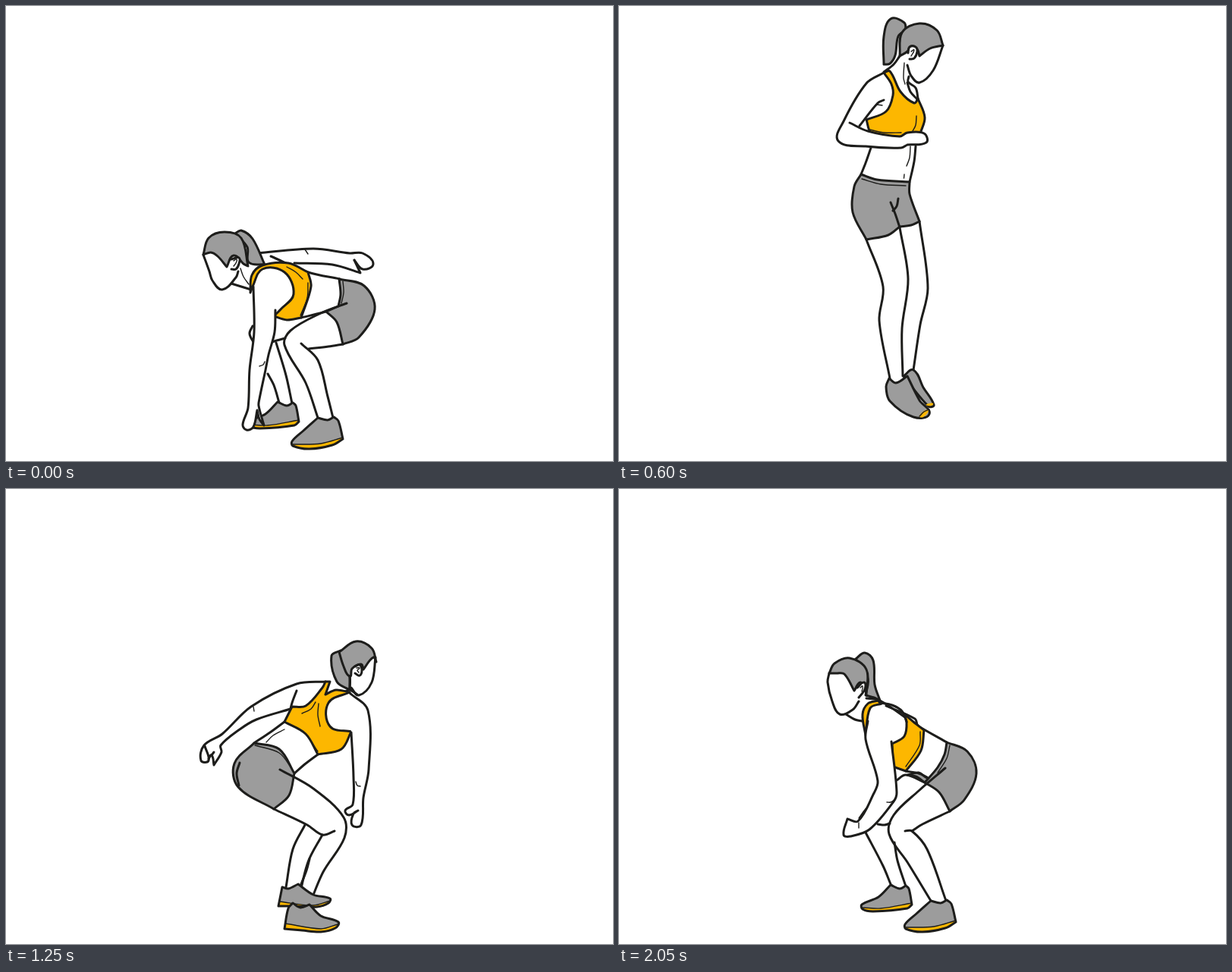
An HTML page for the animation above (2.2 s loop, 800 px wide and 600 px high).

```html
<!DOCTYPE html>
<html lang="en">
<head>
<meta charset="utf-8">
<title>Squat jump with turn</title>
<style>
html, body { margin: 0; width: 100%; height: 100%; overflow: hidden; background: #fff; }
svg { display: block; width: 800px; height: 600px; }
path { stroke: #1d1d1b; stroke-linecap: round; stroke-linejoin: round; }
</style>
</head>
<body>
<svg id="stage" viewBox="0 0 800 600"></svg>
<script>
const GREY = "#9c9c9c", ORANGE = "#fdb700";
const stage = document.getElementById("stage");
let layer = stage;

function add(tag, attrs) {
  const node = document.createElementNS("http://www.w3.org/2000/svg", tag);
  for (const key in attrs) node.setAttribute(key, attrs[key]);
  return layer.appendChild(node);
}

function group(attrs, paint) {
  const outer = layer;
  const node = layer = add("g", attrs);
  paint();
  layer = outer;
  return node;
}

// Smooth path through "x,y" points; "!" marks a corner.
function spline(text, closed) {
  const pts = text.split(" ").map(s => {
    const [x, y] = s.replace("!", "").split(",").map(Number);
    return { x, y, corner: s.endsWith("!") };
  });
  const n = pts.length;
  const at = i => closed ? pts[(i + n) % n] : pts[i];
  const handle = (i, j) => {
    const p = at(i), q = at(j), prev = at(i - 1), next = at(i + 1);
    const len = Math.hypot(q.x - p.x, q.y - p.y) / 3;
    const smooth = !p.corner && prev && next;
    const dx = smooth ? next.x - prev.x : q.x - p.x;
    const dy = smooth ? next.y - prev.y : q.y - p.y;
    const k = len * (smooth && j < i ? -1 : 1) / (Math.hypot(dx, dy) || 1);
    return `${p.x + dx * k} ${p.y + dy * k}`;
  };
  let d = `M${pts[0].x} ${pts[0].y}`;
  for (let i = 0; i < (closed ? n : n - 1); i++) {
    const q = at(i + 1);
    d += `C${handle(i, i + 1)} ${handle(i + 1, i)} ${q.x} ${q.y}`;
  }
  return closed ? d + "Z" : d;
}

const path = (points, fill, width, closed) =>
  add("path", { d: spline(points, closed), fill, "stroke-width": width });
const line = points => path(points, "none", 3, false);
const thin = points => path(points, "none", 1.4, false);
const skin = points => path(points, "#fff", 3, false);
const grey = points => path(points, GREY, 3, true);
const orange = points => path(points, ORANGE, 3, true);
const tint = (points, fill) => path(points, fill, 0, true);

function shoe(upper, sole, seam) {
  tint(`${upper} ${sole}`, ORANGE);
  tint(`${upper} ${seam}`, GREY);
  thin(seam);
  path(`${upper} ${sole}`, "none", 3, true);
}

// Turns a drawing about the hips and moves the hips to a new place.
function turned(paint, [hx, hy], [x, y], angle) {
  group({ transform: `translate(${x - hx} ${y - hy}) rotate(${angle} ${hx} ${hy})` }, paint);
}

function shoesLeft() {
  shoe("386,548! 382,527 378,523! 370,527 358,522! 342,538 320,548",
       "321,554 335,557 380,553", "321,552 345,553 386,546!");
  shoe("444,571! 438,547 432,542! 424,546 411,543! 392,560 377,574",
       "378,580 400,584 430,579", "378,578 415,577 444,569!");
}

function shoesRight() {
  shoe("359,550! 364,525! 372,527 385,521! 405,535 427,540",
       "425,546 410,551 380,550", "427,543 405,549 360,544!");
  shoe("367,580! 372,553 378,546! 388,552 400,548! 415,563 438,571",
       "434,579 415,584 390,582", "437,574 415,580 368,573!");
}

function deepLeft() {
  line("325,422 321,432 327,445");
  line("345,485 353,500 360,523");
  line("356,444 369,487 377,524");
  line("348,444 357,441 368,438");
  line("331,326 405,320 453,326 470,326 484,340 470,347 459,335");
  line("459,335 467,352! 430,341 380,339");
  thin("394,321 398,327");
  grey("302,300! 310,296 325,307 341,341! 320,338 318,318");
  line("260,328 268,350 272,362 285,374 303,358 306,350");
  grey("260,328! 267,306 288,298 310,306 319,343! 313,340 300,329 291,344! 279,330 270,325");
  skin("297,334 307,332 307,340 303,347 297,347");
  thin("300,336 304,334 303,339 300,343");
  line("297,366 310,370 323,374");
  thin("309,346 313,357 320,367");
  line("349,330 398,351 440,360");
  orange("322,378! 324,355 338,342 372,339 398,351! 402,370 389,411! 370,414 353,409! 362,400 379,380 367,351 338,347 325,370");
  thin("370,344 382,351 391,360");
  thin("398,365 397,385 388,408");
  line("389,411 425,402 438,396");
  grey("439,360! 472,369 486,400 465,437 444,446! 436,417 422,403! 438,396! 441,380");
  thin("444,363 445,378 442,392");
  line("449,392 415,405 375,428 367,447 395,497 411,543");
  line("444,446 425,449 399,452");
  line("389,445 411,467 424,515 431,543");
  shoesLeft();
  skin("326,370 327,430 321,480 319,530 312,552 317,559 326,555 331,533! 334,545 340,553! 333,527 334,518 342,480 346,460 354,430 355,401");
  thin("334,475 339,473 341,469");
}

function lowLeft() {
  line("325,453 348,497 358,521");
  line("363,466 367,490 378,524");
  line("341,442 350,443 357,441");
  line("317,434 325,423 340,408");
  grey("312,224! 324,216 335,226 337,258 344,279! 336,275 325,272! 328,250");
  line("277,243 275,255 281,280 291,297 308,291 316,280");
  grey("277,243! 284,230 304,223 326,238 326,271! 324,262 318,255 310,266! 297,244 287,243");
  skin("314,262 323,255 324,264 316,275");
  thin("318,262 321,260 320,267");
  line("299,297 311,304 320,306");
  line("326,276 344,279 390,310 432,334");
  line("352,286 390,303 393,311");
  orange("341,279! 328,283 321,297 325,325! 331,289 346,283!");
  orange("375,296! 388,307 402,318! 398,345 378,372! 361,366! 360,336! 376,326 379,307");
  line("344,282 360,285 373,293 379,307");
  thin("397,320 396,338 378,366");
  grey("380,377! 395,374 406,381 413,380! 403,387! 391,379");
  line("378,372 395,375 406,380");
  line("403,387 378,377 366,384");
  grey("432,334! 459,346 471,375 455,410 436,425! 422,400 403,387! 420,367 429,350");
  thin("436,338 432,355 420,374");
  line("430,368 395,398 362,430 356,455 380,492 411,543");
  line("436,425 400,442 386,451");
  line("377,451 386,451 406,475 431,543");
  shoesLeft();
  skin("328,306 325,330 341,385 335,403 315,438 301,435! 296,456 305,458 330,449 362,412 366,400 359,333");
  thin("316,440 316,447");
  thin("353,413 358,413 363,410");
}

function frontHead() {
  line("307,162 312,195 328,218 343,207 347,197");
  grey("307,168! 311,150 329,143 349,152 354,167 350,183! 344,167 331,158 312,160");
  line("354,176 356,181 354,189 350,191");
  grey("350,190! 349,203 354,208! 358,200 354,188");
  line("349,199 346,217");
  thin("326,219 332,230");
  thin("343,211 336,231");
}

function frontBody() {
  frontHead();
  orange("325,220! 318,224 320,262 328,296 341,306! 375,302 400,274! 395,262! 368,267 356,238 356,208! 349,211 347,250 335,270 322,250");
  line("326,297 335,302 345,301");
  thin("337,282 352,299 373,292");
  thin("372,297 385,291 398,279");
  line("397,263 403,280 424,313");
  line("340,305 355,320 363,331");
  thin("352,306 362,319");
  line("366,324 366.5,325");
  grey("363,331! 393,326 417,307! 438,330 446,354 436,380 420,403! 403,385 383,377! 379,382! 368,372 352,368! 364,357 371,347");
  thin("367,335 395,330 418,312");
  line("395,359 385,373 379,382");
  line("378,355 385,361 389,368");
  skin("358,209 388,228 430,244 457,266 436,326 412,357 403,357 394,343 410,335 425,320 432,265!");
  line("432,270 395,260 373,254");
}

function midLeft() {
  frontBody();
  line("324,220 308,232 312,265 315,293 293,345! 275,349 268,367 278,358 295,354 318,329 333,302");
  line("293,345 298,346 294,351 280,353");
  thin("315,293 318,297 322,298");
  line("352,368 325,407 308,445 330,483 357,523");
  line("355,428 342,448 335,452");
  line("342,448 363,487 375,524");
  line("383,377 355,428 350,453 375,487 410,543");
  line("420,403 392,435 381,448 402,476 430,543");
  shoesLeft();
}

function riseLeft() {
  grey("340,492! 350,496 359,490! 362,530 345,545 335,535");
  grey("374,510! 384,514 394,508! 401,540 386,566 372,558");
  tint("374,562 384,558 394,558 386,564", ORANGE);
  line("323,265 312,365 328,440 340,492");
  line("347,380 350,420 360,490");
  line("352,283 345,365 362,450 374,510");
  line("383,314 380,375 394,450 394,508");
  turned(frontBody, [400, 340], [376, 248], 12);
  line("327,116 308,126 284,190 273,228 279,246 291,224 304,190 315,168");
}

function jumpHead() {
  grey("349,77! 349,40 358,17 376,22 378,32! 368,40 364,65 357,76");
  line("427,52 414,85 396,101 385,92 380,78");
  grey("370,66! 373,35 396,23 419,32 427,52! 410,56 396,66! 393,57 385,53 380,60");
  skin("381,62 383,54 391,54 393,60 389,69 383,70");
  thin("385,60 389,58 385,66");
  line("370,66 362,77 349,87");
  thin("376,75 375,95 377,103");
  line("382,93 381,100 391,108 394,122");
}

function jump() {
  jumpHead();
  orange("349,88! 357,86 371,113 389,128 394,122! 403,147 397,168! 362,173 333,168 326,150! 352,139 361,118 359,103");
  line("380,101 384,113 393,123");
  thin("330,163 350,167 372,167");
  thin("392,145 391,157 387,165");
  line("332,187 325,207 319,222");
  line("391,185 389,205 383,232");
  thin("384,185 383,200 379,211");
  thin("376,222 375.5,227");
  skin("349,88 326,102 296,152 289,178 325,185 372,187 380,183! 405,180 402,168 380,167 370,172 328,165 304,154");
  line("349,124 341,128 317,158");
  thin("340,130 347,131");
  grey("319,222! 340,229 383,232! 383,248 396,284! 385,289 370,291! 355,302 326,308! 308,272 310,238");
  thin("320,228 345,235 378,237");
  line("358,259 364,274 370,292");
  line("368,254 366,264 361,270");
  line("326,308 348,370 343,415 357,491");
  line("370,292 381,360 373,425 374,488");
  line("396,284 407,372 397,420 388,480");
  grey("375,488! 388,480 401,503 415,526 408,528");
  tint("405,526 409,524 414,524 412,527", ORANGE);
  grey("356,491! 365,497 380,488! 396,520 409,538 388,542 357,521 352,502");
  tint("396,541 402,534 408,533 401,542", ORANGE);
  thin("396,541 402,535 409,532");
}

function backHead() {
  grey("441,213! 429,220 436,254 453,265! 453,247");
  line("487,222 482,255 465,272 455,262");
  grey("439,215! 461,201 482,210 488,228! 484,222 471,238! 468,231 456,237 453,247 445,234");
  line("453,247 453,265");
  skin("460,234 466,232 469,239 466,246 460,243");
  thin("462,236 466,236 463,239 465,242");
  line("453,264 447,267");
  line("454,265 463,271");
}

function backBody() {
  backHead();
  orange("421,254! 427,254! 421,271! 435,265 453,268! 425,282 427,313 455,320! 442,343 411,350! 395,323 367,307! 377,287! 395,286 417,262");
  thin("390,296 402,290 408,281");
  thin("412,283 411,298 414,313");
  thin("372,310 392,320 411,346");
  line("367,307 348,321 327,335");
  thin("367,317 352,325 343,334");
  line("411,350 395,362 380,375");
  grey("327,335! 360,343 380,375! 373,404 353,422! 306,393 301,362");
  thin("328,338 360,348 378,371");
  line("308,361 304,375 307,391");
}

function backArm() {
  line("421,254 383,257 323,287 285,323 261,338 257,358 267,358 262,339");
  line("267,356 271,351 274,364! 284,347 283,338 308,317 330,304 375,290");
  line("271,351 274,347");
  thin("326,287 327,293");
  line("383,266 377,282 374,294");
}

function nearArm() {
  skin("453,269 477,292 478,370 471,407 468,443 456,443 458,428 464,424! 452,430 447,424 457,416 458,380 455,321");
  thin("461,386 463,391 467,392");
}

function lowRight() {
  backArm();
  backBody();
  nearArm();
  line("361,370 405,395 445,433 446,460 418,505 400,548");
  line("353,422 397,443 417,456 433,451");
  line("417,456 398,492 385,545");
  line("394,443 378,475 369,525");
  line("400,488 396,503 389,521");
  shoesRight();
}

const hips = [340, 375];

function midRight() {
  turned(() => { backBody(); nearArm(); }, hips, [345, 315], -18);
  line("384,175 350,190 310,230 288,282 294,302 304,280 322,246 354,218");
  line("352,196 350,210 352,220");
  line("363,304 405,345 437,420 415,482 400,548");
  line("372,356 392,410 402,428 416,424");
  line("402,428 392,480 385,545");
  line("390,410 376,480 369,525");
  line("393,490 389,521");
  shoesRight();
}

function deepRight() {
  turned(() => { backArm(); backBody(); }, hips, [331, 407], 10);
  line("353,406 405,418 447,444 446,470 416,520 400,548");
  line("336,455 395,463 415,466 430,461");
  line("415,466 398,505 385,545");
  line("386,463 374,500 369,525");
  line("399,500 389,521");
  shoesRight();
  skin("460,323 481,352 474,430 458,515 461,535 455,550 445,551 441,540 446,520 446,490 454,395 453,374");
  thin("452,470 455,474 460,474");
}

const poses = [deepLeft, lowLeft, midLeft, riseLeft, jump, midRight, lowRight, deepRight];
const groups = poses.map(paint => group({ display: "none" }, paint));

// There and back again; the jump is held a little longer.
const order = [...poses.keys(), ...[...poses.keys()].slice(1, -1).reverse()];
const holdOf = i => poses[i] === jump ? 200 : 150;
const loop = order.reduce((sum, i) => sum + holdOf(i), 0);

function show(time) {
  let rest = time % loop;
  const current = order.find(i => (rest -= holdOf(i)) < 0);
  groups.forEach((g, i) => g.setAttribute("display", i === current ? "inline" : "none"));
}

const start = performance.now();
function tick() {
  show(performance.now() - start);
  requestAnimationFrame(tick);
}
show(0);
requestAnimationFrame(tick);
</script>
</body>
</html>
```
